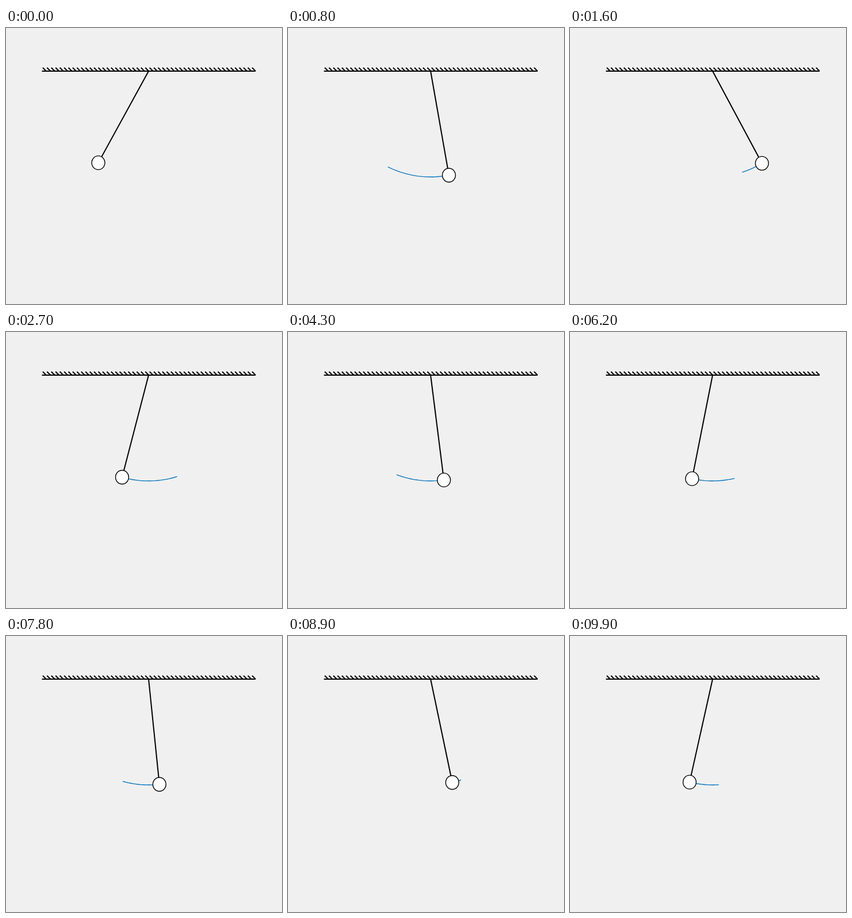
An HTML page with a canvas that plays this animation: 480x480 px, repeating every 10 s.

```html
<!DOCTYPE html>
<html lang="en">
<head>
<meta charset="utf-8">
<title>Damped pendulum</title>
<style>
  html, body { margin: 0; width: 100%; height: 100%; overflow: hidden; background: #f0f0f0; }
  canvas { display: block; }
</style>
</head>
<body>
<canvas id="stage" width="480" height="480"></canvas>
<script>
const ctx = document.getElementById("stage").getContext("2d");
const LOOP = 10000, STEP = 100;
const PIVOT = { x: 248, y: 75 }, REACH = { x: 175, y: 184 };
const AMP = 0.5908, DECAY = 0.077, OMEGA = 1.817, PHASE = -1.088;
const TRAIL_DT = 1 / 30, TRAIL_STEPS = 20;

// Damped swing; the period shortens slightly as the amplitude falls.
function angle(t) {
  const lag = AMP * AMP / (32 * DECAY) * (1 - Math.exp(-2 * DECAY * t));
  return AMP * Math.exp(-DECAY * t) * Math.sin(PHASE + OMEGA * (t - lag));
}

function bob(t) {
  const a = angle(t);
  return [PIVOT.x + REACH.x * Math.sin(a), PIVOT.y + REACH.y * Math.cos(a)];
}

function polyline(points, color, width) {
  ctx.beginPath();
  points.forEach(p => ctx.lineTo(...p));
  ctx.strokeStyle = color;
  ctx.lineWidth = width;
  ctx.stroke();
}

function drawCeiling() {
  const left = 62.5, right = 434, count = 50;
  polyline([[left, 75], [right, 75]], "#000", 2);
  for (let i = 1; i <= count; i++) {
    const x = left + (right - left) * i / count;
    polyline([[x - 6, 69], [x, 75]], "#000", 2);
  }
}

function draw(t) {
  ctx.fillStyle = "#f0f0f0";
  ctx.fillRect(0, 0, 480, 480);
  drawCeiling();

  const trail = [];
  for (let i = TRAIL_STEPS; i >= 0; i--) trail.push(bob(Math.max(0, t - i * TRAIL_DT)));
  polyline(trail, "#0072bd", 1.35);

  const end = bob(t);
  polyline([[PIVOT.x, PIVOT.y], end], "#000", 2);
  ctx.beginPath();
  ctx.ellipse(...end, 11.4, 12, 0, 0, 2 * Math.PI);
  ctx.fillStyle = "#fff";
  ctx.fill();
  ctx.lineWidth = 1.4;
  ctx.stroke();
}

const start = performance.now();
function tick() {
  const ms = (performance.now() - start) % LOOP;
  draw(Math.floor(ms / STEP) * STEP / 1000);
  requestAnimationFrame(tick);
}
tick();
</script>
</body>
</html>
```
